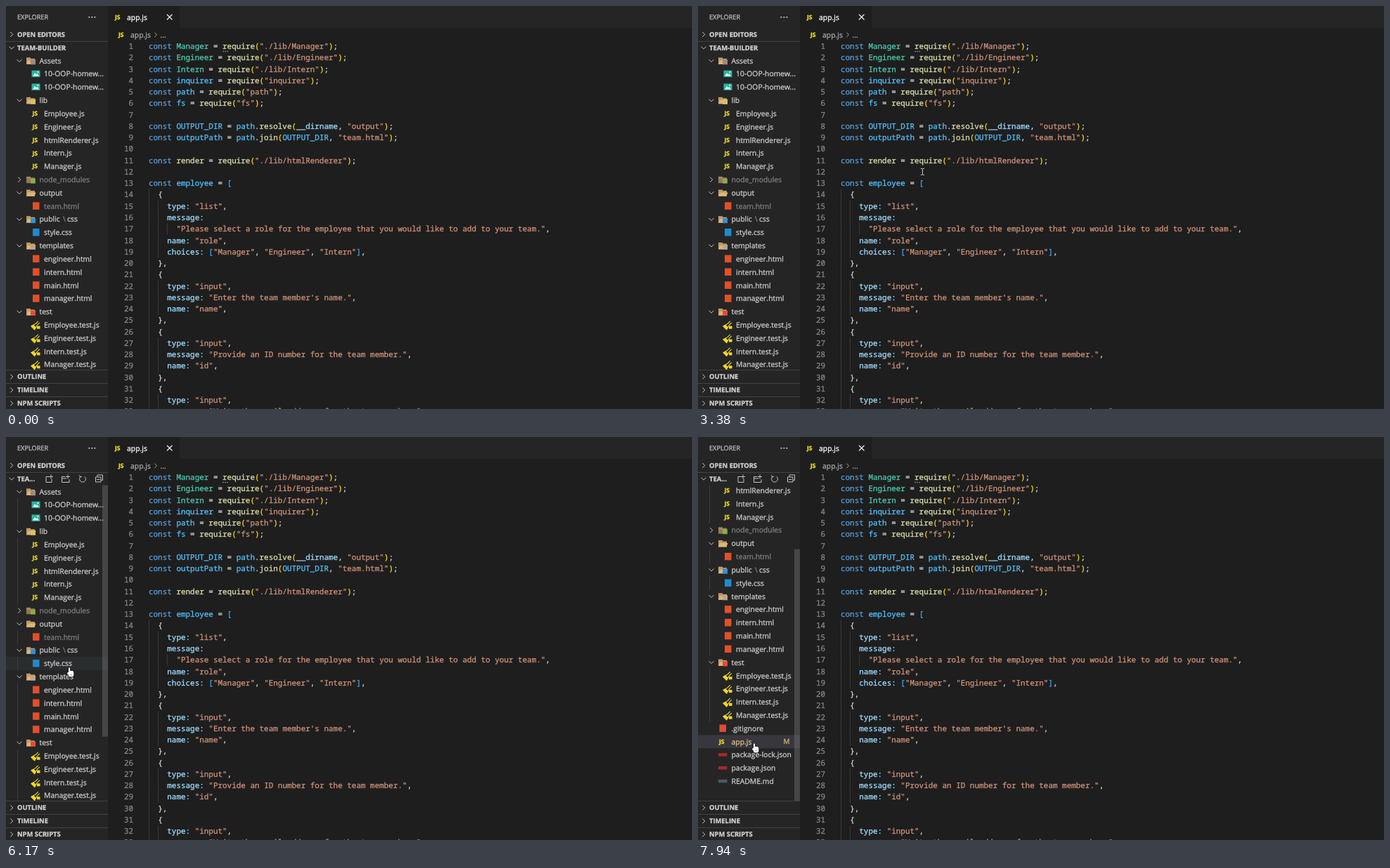
Recreate the animation shown at these times as an HTML page with a canvas. Size 976x574 px, loop 8000 ms.

```html
<!DOCTYPE html>
<html lang="en">
<head>
<meta charset="utf-8">
<title>Code editor</title>
<style>
html, body { margin: 0; width: 100%; height: 100%; overflow: hidden; background: #1e1e1e; }
canvas { display: block; }
</style>
</head>
<body>
<canvas id="stage" width="976" height="574"></canvas>
<script>
const g = document.getElementById('stage').getContext('2d');
const LOOP = 8000, STEP = 77, SIDE = 145, CHAR = 6.565, LINE = 16.26, ROW = 18.82, TOP = 68.5, BOTTOM = 518;
const UI = '"Open Sans", "Noto Sans", sans-serif';
const MONO = '10.94px "Noto Sans Mono", "DejaVu Sans Mono", monospace';

const CODE = `const Manager = require("./lib/Manager");
const Engineer = require("./lib/Engineer");
const Intern = require("./lib/Intern");
const inquirer = require("inquirer");
const path = require("path");
const fs = require("fs");

const OUTPUT_DIR = path.resolve(__dirname, "output");
const outputPath = path.join(OUTPUT_DIR, "team.html");

const render = require("./lib/htmlRenderer");

const employee = [
  {
    type: "list",
    message:
      "Please select a role for the employee that you would like to add to your team.",
    name: "role",
    choices: ["Manager", "Engineer", "Intern"],
  },
  {
    type: "input",
    message: "Enter the team member's name.",
    name: "name",
  },
  {
    type: "input",
    message: "Provide an ID number for the team member.",
    name: "id",
  },
  {
    type: "input",
    message: "Write the email address for the team member.",`.split('\n');

// depth, icon, label
const files = (icon, names, ext) => names.split(' ').map(n => [1, icon, n + ext]);
const TREE = [
  [0, 'folder:#9a8a80', 'Assets'],
  ...files('image', '10-OOP-homew 10-OOP-homew', '...'),
  [0, 'folder:#d8c060', 'lib'],
  ...files('js', 'Employee Engineer htmlRenderer Intern Manager', '.js'),
  [0, 'closed:#8bc34a', 'node_modules'],
  [0, 'folder:', 'output'],
  [1, 'box:#e44f26', 'team.html'],
  [0, 'folder:#2f8fd8', 'public'],
  [1, 'box:#1f8ad0', 'style.css'],
  [0, 'folder:#b8a48c', 'templates'],
  ...files('box:#e44f26', 'engineer intern main manager', '.html'),
  [0, 'folder:#e8483c', 'test'],
  ...files('flask', 'Employee Engineer Intern Manager', '.test.js'),
  [0, 'box:#dd4c35', '.gitignore'],
  [0, 'js', 'app.js'],
  [0, 'bar:#a82a2a', 'package-lock.json'],
  [0, 'bar:#a82a2a', 'package.json'],
  [0, 'bar:#4d5a66', 'README.md']
];
const ACTIVE = TREE.findIndex(r => r[2] === 'app.js');

// pointer moves: start, end, goal x, goal y, bow
const HOME = [990, 590];
const MOVES = [
  [440, 440, 960, 570], [520, 520, ...HOME],
  [1300, 1850, 445, 395], [2150, 2381, 479, 322], [2458, 2920, 262, 162, -100],
  [3000, 3380, 324, 242], [3690, 4070, 264, 224],
  [4920, 5232, 118.5, 261.5], [5310, 5700, 90, 305], [5770, 5770, 89, 304],
  [5920, 6154, 90, 328], [6232, 6388, 89, 331], [6466, 6700, 89, 357],
  [6780, 7160, 69.5, 430], [7330, 7330, 69, 429.5], [7712, 7790, 80.5, 436.5], [7940, 7940, 80, 436]
];

const clamp = v => Math.max(0, Math.min(1, v));
const mix = (a, b, p) => a + (b - a) * p;

function pointer(t) {
  let [x, y] = HOME;
  for (const [start, end, gx, gy, bow = 0] of MOVES) {
    if (t < start) break;
    const steps = Math.round((end - start) / STEP) + 1;
    const p = clamp((Math.floor((t - start) / STEP + 0.05) + 1) / steps);
    const e = p * p * (3 - 2 * p);
    x = mix(x, gx, e);
    y = mix(y, gy, e) + bow * Math.sin(Math.PI * e);
  }
  return [x, y];
}

function rect(x, y, w, h, c) { g.fillStyle = c; g.fillRect(x, y, w, h); }

// a hairline outline gives the text its weight
function text(s, x, y, c = '#cccccc', font = '10.4px ' + UI) {
  g.font = font;
  g.fillStyle = g.strokeStyle = c;
  g.lineWidth = 0.3;
  g.fillText(s, x, y);
  g.strokeText(s, x, y);
}

function line(pts, c, w = 1, fill) {
  g.beginPath();
  pts.forEach(([x, y], i) => i ? g.lineTo(x, y) : g.moveTo(x, y));
  if (fill) { g.closePath(); g.fillStyle = fill; g.fill(); }
  if (c) { g.strokeStyle = c; g.lineWidth = w; g.stroke(); }
}

function chevron(x, y, open, c = '#c5c5c5', r = 3.5) {
  line(open ? [[x - r, y - r / 2], [x, y + r / 2], [x + r, y - r / 2]]
            : [[x - r / 2, y - r], [x + r / 2, y], [x - r / 2, y + r]], c);
}

function plus(x, y, r, c) {
  line([[x - r, y], [x + r, y]], c);
  line([[x, y - r], [x, y + r]], c);
}

function tint(w) {
  if (w[0] === '"') return '#ce9178';
  if (w === 'const') return '#569cd6';
  if (/^(Manager|Engineer|Intern|any)$/.test(w)) return '#4ec9b0';
  if (/^(require|resolve|join|render)$/.test(w)) return '#dcdcaa';
  if (/^\w+:$|^__/.test(w)) return '#9cdcfe';
  if (/^\w/.test(w)) return '#4fc1ff';
  return { '(': '#ffd700', ')': '#ffd700', '[': '#3fa7f0', ']': '#3fa7f0' }[w] || '#d4d4d4';
}

function codeLine(s, x, y) {
  for (const m of s.matchAll(/"[^"]*"|\w+:?|\S/g))
    for (const w of m[0].matchAll(/\S+/g))
      text(w[0], x + (m.index + w.index) * CHAR, y, tint(m[0]), MONO);
}

const lineY = n => 57.5 + (n - 1) * LINE;

function jsMark(x, y) { text('JS', x, y + 3, '#f5de19', 'bold 8.6px ' + UI); }

function editor() {
  rect(SIDE, 0, 976 - SIDE, 574, '#1e1e1e');
  rect(247, 0, 729, 31, '#252526');
  jsMark(155, 16);
  text('app.js', 172, 19.7, '#ffffff');
  line([[229, 12], [236.5, 19.5]], '#f0f0f0', 1.2);
  line([[236.5, 12], [229, 19.5]], '#f0f0f0', 1.2);
  jsMark(160, 40.5);
  text('app.js', 177, 44.5, '#a9a9a9');
  chevron(213, 41, false, '#a0a0a0', 3.2);
  text('...', 219.5, 44.5, '#a9a9a9');

  CODE.forEach((s, i) => {
    const y = lineY(i + 1), indent = s.search(/\S/);
    for (let c = 0; c < indent; c += 2)
      rect(Math.round(203 + c * CHAR), y - LINE / 2, 1, LINE, '#3a3a3a');
    g.textAlign = 'right';
    text(i + 1, 181, y + 3.6, '#858585', MONO);
    g.textAlign = 'left';
    codeLine(s, 203, y + 3.6);
  });
  for (let i = 0; i < 3; i++) rect(308.5 + i * 3, 64, 1.3, 1.3, '#b0b0b0');
}

function folder(x, y, c, open) {
  rect(x, y - 4.5, 6, 3, '#c09a66');
  rect(x, y - 3, 12, 8, '#c09a66');
  if (open) line([[x + 2.5, y - 0.5], [x + 13.5, y - 0.5], [x + 11.5, y + 5], [x, y + 5]], null, 0, '#dcb67a');
  if (c) rect(x + 6, y - 1.5, 7, 7, c);
}

function flask(x, y) {
  g.save();
  g.translate(x + 6, y);
  g.rotate(Math.PI / 4);
  line([[-1.5, -6], [-1.5, -1], [-3.5, 6], [3.5, 6], [1.5, -1], [1.5, -6]], '#f0d820', 1.1);
  line([[-2.5, 2], [2.5, 2], [3.5, 6], [-3.5, 6]], null, 0, '#f0d820');
  g.restore();
  rect(x + 7.5, y + 1.5, 4.5, 4, '#f0d820');
}

function icon(kind, x, y) {
  const [k, c] = kind.split(':');
  if (k === 'folder' || k === 'closed') folder(x, y, c, k === 'folder');
  if (k === 'js') jsMark(x + 1, y);
  if (k === 'box') rect(x + 1.5, y - 5.5, 9.5, 10.5, c);
  if (k === 'bar') rect(x, y - 2.5, 12.5, 4.5, c);
  if (k === 'flask') flask(x, y);
  if (k === 'image') {
    rect(x, y - 5, 12, 9.5, '#2bb39a');
    line([[x + 1.5, y + 3], [x + 4.5, y - 1.5], [x + 6.5, y + 1], [x + 8, y - 0.5], [x + 10.5, y + 3]], null, 0, '#e8fff8');
    rect(x + 8, y - 3.5, 1.8, 1.8, '#e8fff8');
  }
}

function tree(scroll, x, y, inside, glow) {
  g.save();
  g.beginPath(); g.rect(0, TOP, SIDE, BOTTOM - TOP); g.clip();
  const over = inside && y > TOP && y < BOTTOM ? Math.floor((y - TOP + scroll) / ROW) : -1;
  TREE.forEach(([depth, kind, label], i) => {
    const top = TOP + i * ROW - scroll, mid = top + ROW / 2;
    if (i === ACTIVE) rect(0, top, SIDE, ROW, '#37373d');
    else if (i === over) rect(0, top, SIDE, ROW, '#2a2d2e');
    if (depth && inside) rect(16, top, 1, ROW, '#3c3c3d');
    if (/^(folder|closed)/.test(kind)) chevron(19, mid, kind[0] === 'f');
    const dim = label === 'node_modules' || label === 'team.html';
    g.globalAlpha = label === 'node_modules' ? 0.7 : 1;
    icon(kind, 29 + depth * 7.5, mid);
    g.globalAlpha = 1;
    text(label, 47.5 + depth * 6.5, mid + 3.7, dim ? '#7f7f7f' : i === ACTIVE ? '#e2c08d' : '#cccccc');
    if (label === 'public') {
      text('\\', 81, mid + 3.7, '#808080');
      text('css', 87, mid + 3.7);
    }
    if (i === ACTIVE) text('M', 121.5, mid + 3.5, '#d0b284', '10px ' + UI);
  });
  if (inside) {
    const view = BOTTOM - TOP, ratio = view / (view + 114.5);
    g.globalAlpha = 0.4 * glow;
    rect(137, TOP + scroll * ratio, 8, view * ratio, '#797979');
    g.globalAlpha = 1;
  }
  g.restore();
}

function section(label, y, open) {
  chevron(8, y, open);
  text(label, 16, y + 3.4, '#d0d0d0', 'bold 9.4px ' + UI);
}

function tools(y) {
  const c = '#c5c5c5';
  line([[62, y - 3], [57, y - 3], [57, y + 5], [65, y + 5], [65, y]], c);
  plus(64, y - 3, 3, c);
  line([[84, y - 3], [79.5, y - 3], [79.5, y + 5], [90, y + 5], [90, y + 1]], c);
  line([[80, y - 0.5], [86, y - 0.5]], c);
  plus(88, y - 3, 3, c);
  g.beginPath(); g.arc(109, y + 0.3, 4.4, -0.9, 4); g.stroke();
  line([[104.5, y - 5], [105.5, y - 2.5], [108, y - 3]], c);
  g.strokeRect(127.5, y - 2.5, 7.5, 7);
  line([[130, y - 3], [130, y - 5.5], [137.5, y - 5.5], [137.5, y + 2], [135, y + 2]], c);
  line([[129, y + 1], [133.5, y + 1]], c);
}

function sidebar(scroll, x, y, glow) {
  const inside = x < SIDE;
  rect(0, 0, SIDE, 574, '#252526');
  text('EXPLORER', 16, 19.2, '#bbbbbb', '9.2px ' + UI);
  for (let i = 0; i < 3; i++) rect(117.5 + i * 4, 15, 1.8, 1.8, '#c5c5c5');
  section('OPEN EDITORS', 40.5, false);
  section(inside ? 'TEA...' : 'TEAM-BUILDER', 59.5, true);
  if (inside) tools(59.5);
  tree(scroll, x, y, inside, glow);
  ['OUTLINE', 'TIMELINE', 'NPM SCRIPTS'].forEach((s, i) => {
    section(s, 528 + i * 19, false);
    rect(0, 518 + i * 19, SIDE, 1, '#424243');
  });
  rect(0, 50, SIDE, 1, '#424243');
}

function tip(x, y, w, h) {
  rect(x, y, w, h, '#454545');
  rect(x + 1, y + 1, w - 2, h - 2, '#252526');
}

function pathTip(s, x, y, right) {
  tip(x, y, right - x, 15);
  text(s, x + 5, y + 11, '#cccccc', '9.6px ' + UI);
}

function hoverInfo(t) {
  if (t < 4470 || t >= 4990) return;
  rect(242, lineY(11) - LINE / 2, 6 * CHAR, LINE, '#203040');
  codeLine('render', 203 + 6 * CHAR, lineY(11) + 3.6);
  g.globalAlpha = clamp(Math.floor((t - 4470) / 75) / 2);
  tip(242, 189, 259, 23);
  codeLine('const render: (employees: any) => any', 250, 204.2);
  g.globalAlpha = 1;
}

function foldMarks(t) {
  if (t < 5070) return;
  g.globalAlpha = clamp((5320 - t) / 320);
  CODE.forEach((s, i) => { if (s === '  {') chevron(193, lineY(i + 1), true, '#c5c5c5', 3); });
  g.globalAlpha = 1;
}

function hand(x, y) {
  g.beginPath();
  g.roundRect(x - 1, y + 0.5, 2.2, 9, 1.1);
  g.roundRect(x - 1, y + 5, 7.3, 8.5, 2.2);
  g.roundRect(x - 2.7, y + 7, 3, 3.5, 1.2);
  g.strokeStyle = '#111111'; g.lineWidth = 1.2; g.stroke();
  g.fillStyle = '#ffffff'; g.fill();
  for (const fx of [1.5, 3.5]) rect(x + fx, y + 9.5, 0.7, 2.2, '#666666');
}

function arrow(x, y) {
  line([[0, 0], [0, 11], [2.5, 8.7], [4.2, 12.4], [5.8, 11.7], [4.2, 8.2], [7.6, 8.2]]
    .map(([a, b]) => [x + a, y + b]), '#111111', 0.8, '#ffffff');
}

function beam(x, y) {
  rect(x - 0.5, y - 4.5, 1, 9, '#c8c8c8');
  for (const dy of [-5, 4]) {
    rect(x - 2.5, y + dy, 2, 1, '#c8c8c8');
    rect(x + 0.5, y + dy, 2, 1, '#c8c8c8');
  }
}

function draw(t) {
  const [x, y] = pointer(t);
  const scroll = t < 6380 ? 0 : t < 6540 ? 85.5 : 114.5;
  g.textRendering = 'geometricPrecision';
  g.lineJoin = 'round';
  editor();
  hoverInfo(t);
  foldMarks(t);
  sidebar(scroll, x, y, clamp((t - 5080) / 300));
  if (t >= 5920 && t < 6070) pathTip('~\\Documents\\code\\homework\\team-builder\\public\\css', 92, 326, 370);
  if (t >= 7560 && t < 7785) pathTip('~\\Documents\\code\\homework\\team-builder\\app.js • Modified', 70, 445, 362);
  (x < SIDE ? hand : x < 202 ? arrow : beam)(x, y);
}

function tick() {
  draw(performance.now() % LOOP);
  requestAnimationFrame(tick);
}
tick();
</script>
</body>
</html>
```
